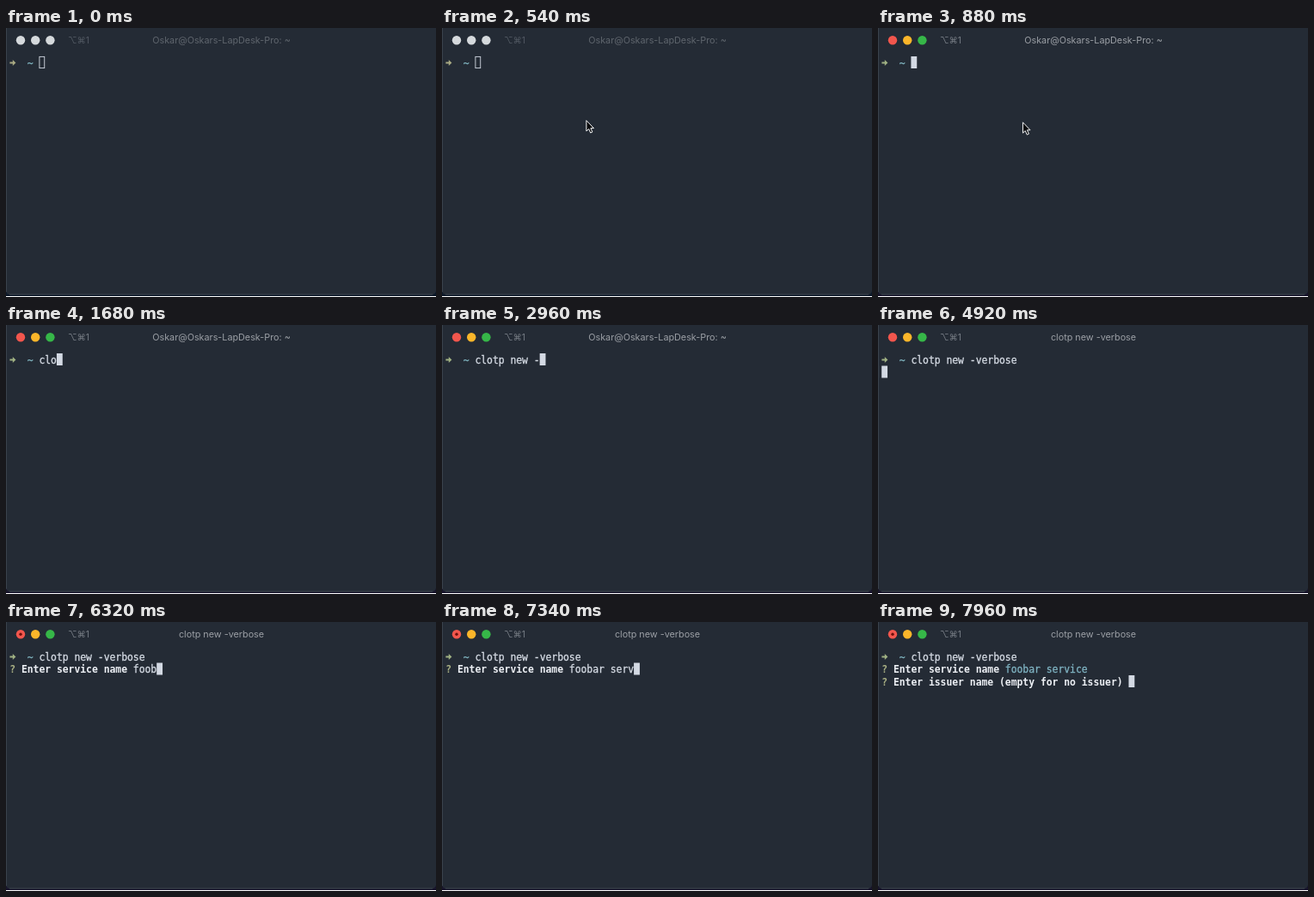
Recreate the animation shown at these times as an HTML page with a canvas. Size 500 px wide and 313 px high, loop 8 s.

```html
<!DOCTYPE html>
<html lang="en">
<head>
<meta charset="utf-8">
<title>Terminal</title>
<style>
  html, body { margin: 0; width: 100%; height: 100%; overflow: hidden; background: #242b35; }
  canvas { display: block; }
</style>
</head>
<body>
<canvas id="stage" width="500" height="313"></canvas>
<script>
const ctx = document.getElementById('stage').getContext('2d');
const LOOP = 8000, CELL = 6.84, LEFT = 4.2, ROW = 14.5;
const MONO = '11.4px "DejaVu Sans Mono", monospace';
const SANS = 'Inter, "DejaVu Sans", sans-serif';
const FOCUS = 820, RUN = 4920, ASK = 4980, ANSWERED = 7940, ASK_NEXT = 7960;

const command = {
  text: 'clotp new -verbose',
  keys: [1260, 1440, 1680, 1820, 1900, 2120, 2640, 2720, 2800, 2880, 2960,
         3420, 3540, 3700, 3940, 4040, 4220, 4260]
};
const answer = {
  text: 'foobar service',
  keys: [5920, 6020, 6200, 6320, 6540, 6580, 6760, 6940, 7020, 7100, 7340, 7460, 7580, 7780]
};
const typed = (line, t) => line.text.slice(0, line.keys.filter(k => k <= t).length);
const clamp = v => Math.max(0, Math.min(1, v));
const mix = (a, b, p) => a + (b - a) * p;

function write(text, col, row, color, bold) {
  ctx.font = (bold ? 'bold ' : '') + MONO;
  ctx.fillStyle = ctx.strokeStyle = color;
  ctx.lineWidth = 0.3;
  ctx.textAlign = 'left';
  const y = Math.round(44.8 + row * ROW);
  [...text].forEach((ch, i) => {
    const x = LEFT + (col + i) * CELL;
    ctx.fillText(ch, x, y);
    if (!bold) ctx.strokeText(ch, x, y); // medium weight
  });
}

function label(text, x, y, size, color, align) {
  ctx.font = size + 'px ' + SANS;
  ctx.fillStyle = color;
  ctx.textAlign = align;
  ctx.fillText(text, x, y);
}

function dot(x, y, r, color) {
  ctx.fillStyle = color;
  ctx.beginPath();
  ctx.arc(x, y, r, 0, 7);
  ctx.fill();
}

function shape(path, x, y, fill, stroke) {
  ctx.save();
  ctx.translate(x, y);
  const p = new Path2D(path);
  ctx.fillStyle = fill;
  ctx.fill(p);
  if (stroke) {
    ctx.strokeStyle = stroke;
    ctx.lineWidth = 1;
    ctx.stroke(p);
  }
  ctx.restore();
}

function drawWindow(t, focused) {
  ctx.fillStyle = focused ? '#17132b' : '#0b1729';
  ctx.fillRect(0, 0, 500, 313);
  ctx.fillStyle = '#242b35';
  ctx.beginPath();
  ctx.roundRect(0, -8, 500, 318.5, 5);
  ctx.fill();
  ctx.fillStyle = '#3a424c';
  ctx.fillRect(0, 0, 1, 307);
  ctx.fillRect(4, 309.5, 492, 1);
  ctx.fillStyle = '#fff';
  ctx.fillRect(0, 312, 500, 1);

  const lights = focused ? ['#f2564d', '#fbb62a', '#36b748'] : Array(3).fill('#d5d9dc');
  lights.forEach((color, i) => dot(17 + i * 17.2, 14.3, 5.2, color));
  ctx.globalAlpha = clamp((t - 5720) / 60);
  dot(17, 14.3, 1.7, '#6d100c');
  ctx.globalAlpha = 1;

  label('⌥⌘1', 72, 18, 10.3, focused ? '#777d85' : '#525963', 'left');
  const title = t < RUN ? 'Oskar@Oskars-LapDesk-Pro: ~' : command.text;
  label(title, 250.5, 18, 10.8, focused ? '#9b9fa5' : '#5f656d', 'center');
}

function drawTerminal(t, focused) {
  shape('M0 3H3.4V.6L7 4 3.4 7.4V5H0Z', 4.4, 36.5, focused ? '#a0b183' : '#a9aa83');
  write('~', 3, 0, '#82b9c4');
  const input = typed(command, t);
  write(input, 5, 0, '#d5dbe4');

  let col = 5 + input.length, row = 0;
  if (t >= RUN) { col = 0; row = 1; }
  if (t >= ASK) {
    const reply = typed(answer, t);
    write('?', 0, 1, '#a9b084', true);
    write('Enter service name', 2, 1, '#eceff4', true);
    write(reply, 21, 1, t < ANSWERED ? '#d5dbe4' : '#7fb3c2');
    col = 21 + reply.length;
  }
  if (t >= ANSWERED) { col = 0; row = 2; }
  if (t >= ASK_NEXT) {
    write('?', 0, 2, '#a9b084', true);
    write('Enter issuer name (empty for no issuer)', 2, 2, '#eceff4', true);
    col = 42;
  }

  const x = LEFT + col * CELL, y = 33 + row * ROW;
  if (focused) {
    ctx.fillStyle = '#d3d9e3';
    ctx.fillRect(x, y, CELL, 14);
  } else {
    ctx.strokeStyle = '#d3d9e3';
    ctx.lineWidth = 0.9;
    ctx.strokeRect(x + 0.5, y + 0.4, CELL - 1, 13.2);
  }
}

function drawPointer(t) {
  if (t < 20 || t > 1240) return;
  const arrive = 1 - (1 - clamp((t - 20) / 520)) ** 2;
  const leave = clamp((t - 840) / 400) ** 2;
  const x = mix(mix(474, 167.3, arrive), 219, leave);
  const y = mix(mix(312, 106.8, arrive), 313, leave);
  shape('M.6 .8V13.2L3.4 10.6 5.4 15.2 7.6 14.2 5.6 9.8H9.2Z', x, y, '#08090b', '#f4f5f6');
}

function frame() {
  const t = performance.now() % LOOP;
  const focused = t >= FOCUS;
  drawWindow(t, focused);
  drawTerminal(t, focused);
  drawPointer(t);
  requestAnimationFrame(frame);
}
frame();
</script>
</body>
</html>
```
